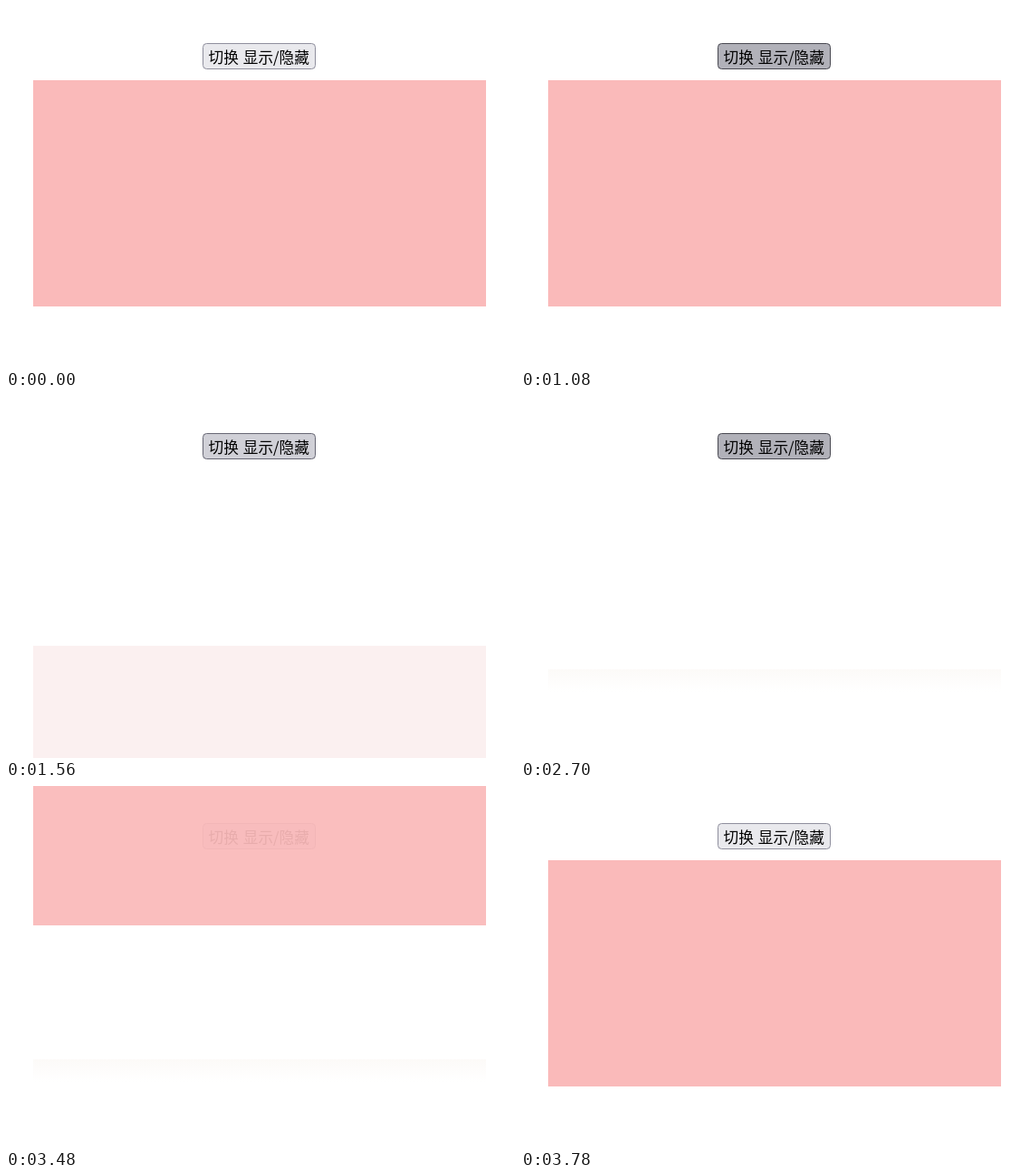
These frames come from a looping animation (562 px wide and 400 px high, 4440 ms). An HTML page:

```html
<!DOCTYPE html>
<html lang="zh-CN">
<head>
<meta charset="utf-8">
<title>切换 显示/隐藏</title>
<style>
html, body { margin: 0; width: 100%; height: 100%; overflow: hidden; background: #fff; }
svg { display: block; width: 562px; height: 400px; }
text { font: 16.67px "Noto Sans CJK SC", "Noto Sans CJK", sans-serif; word-spacing: 1.2px; }
</style>
</head>
<body>
<svg viewBox="0 0 562 400">
  <defs>
    <linearGradient id="fade" x1="0" y1="0" x2="0" y2="1">
      <stop offset="0" stop-color="#fcfaf8"/>
      <stop offset="1" stop-color="#fff"/>
    </linearGradient>
  </defs>
  <rect id="trace" x="30" y="302" width="500" height="25" fill="url(#fade)"/>
  <rect id="button" x="217.5" y="41.5" width="124" height="28" rx="4"/>
  <text x="223.5" y="63.4">切换 显示/隐藏</text>
  <rect id="box" x="30" width="500" height="250"/>
</svg>
<script>
const LOOP = 4440, STEP = 60, TOP = 82, HEIGHT = 250;
const LEAVE = { start: 1121, length: 566 };
const ENTER = { start: 3365, length: 400 };

// [fill, border]
const normal = ['#e9e9ed', '#8f8f9d'];
const hover = ['#d0d0d7', '#676774'];
const active = ['#b1b1b9', '#484851'];
const states = [
  [0, normal], [540, hover], [1080, active], [1140, hover],
  [2700, active], [2880, hover], [3180, normal]
];

const byId = id => document.getElementById(id);
const box = byId('box'), button = byId('button'), trace = byId('trace');
const set = (el, attrs) => {
  for (const name in attrs) el.setAttribute(name, attrs[name]);
};
const progress = (t, { start, length }) =>
  Math.min(1, Math.max(0, (t - start) / length));

function boxLook(t) {
  const out = progress(t, LEAVE), back = progress(t, ENTER);
  if (back > 0) {
    return { shift: back - 1, fade: 0, opacity: 0.9 + 0.1 * back };
  }
  return { shift: out, fade: out, opacity: out < 1 ? 1 : 0 };
}

function draw(time) {
  const t = Math.floor((time % LOOP) / STEP) * STEP;
  const [fill, stroke] = states.filter(([at]) => at <= t).pop()[1];
  set(button, { fill, stroke });

  const { shift, fade, opacity } = boxLook(t);
  const red = Math.round(250 + 5 * fade ** 6);
  const tint = Math.round(186 + 69 * fade);
  set(box, {
    y: Math.round(TOP + HEIGHT * shift),
    fill: `rgb(${red},${tint},${tint})`,
    opacity
  });
  set(trace, { opacity: t >= 1680 && t < 3780 ? 1 : 0 });
}

const begin = performance.now();
function tick() {
  draw(performance.now() - begin);
  requestAnimationFrame(tick);
}
tick();
</script>
</body>
</html>
```
